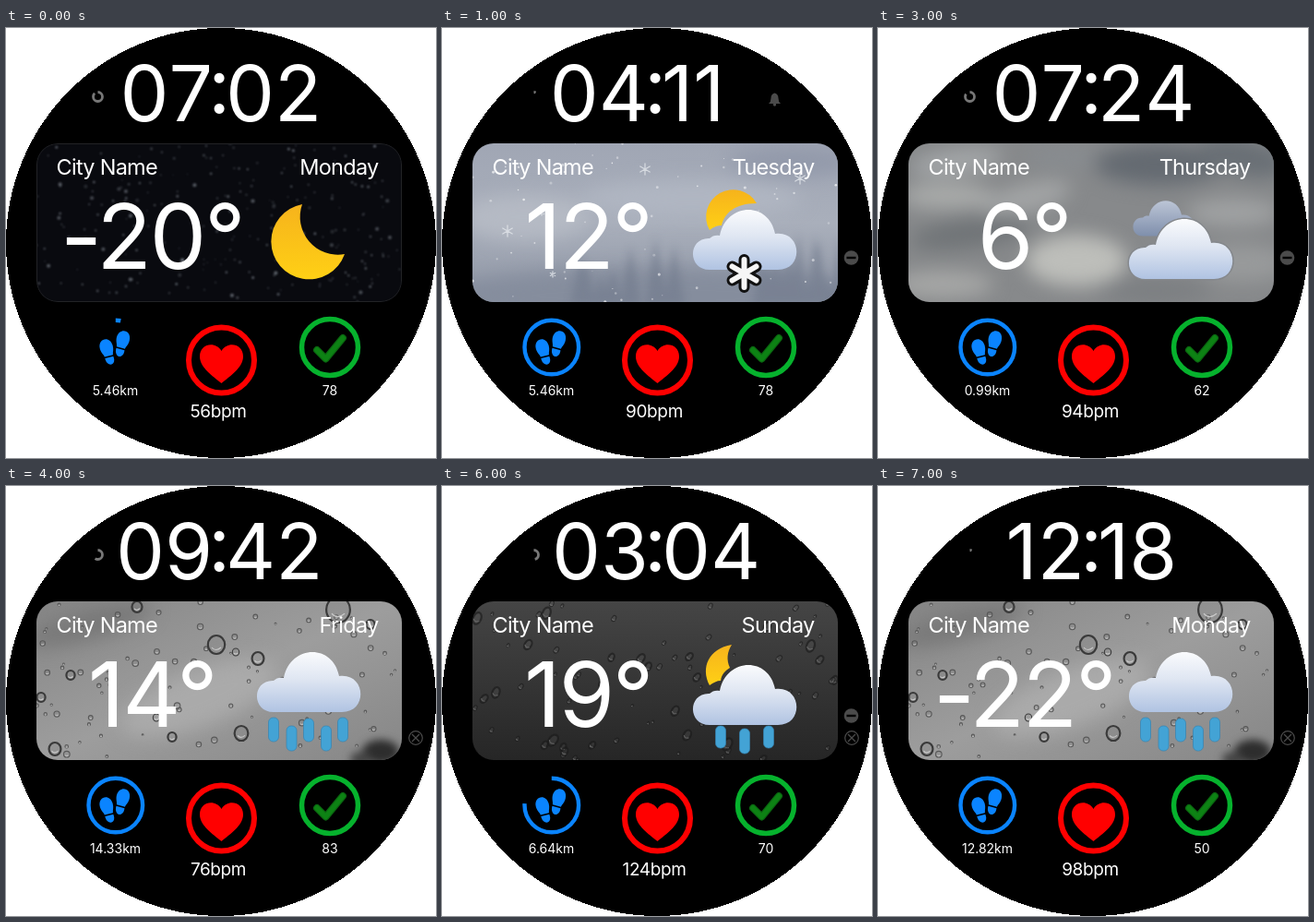
An HTML page for the animation above (8 s loop, 466 by 466 pixels).

```html
<!DOCTYPE html>
<html lang="en">
<head>
<meta charset="utf-8">
<title>Watch face</title>
<style>
  html, body { margin: 0; width: 100%; height: 100%; overflow: hidden; background: #fff; }
  svg { display: block; width: 466px; height: 466px; }
  filter { color-interpolation-filters: sRGB; }
  text { font-family: Inter, Roboto, sans-serif; font-optical-sizing: none; fill: #fff; }
  .time { font-size: 84px; font-kerning: none; }
  .temp { font-size: 98px; letter-spacing: -.025em; }
  .label { font-size: 23.5px; letter-spacing: -.031em; }
  .pulse { font-size: 19px; letter-spacing: -.02em; }
  .small { font-size: 14px; }
  .mid { text-anchor: middle; }
  .end { text-anchor: end; }
  .face { visibility: hidden; }
  .face.on { visibility: visible; }
</style>
</head>
<body>
<svg viewBox="0 0 466 466">
  <defs>
    <clipPath id="card"><rect x="33" y="125" width="396" height="172" rx="23"/></clipPath>
    <filter id="soft" x="-50%" y="-50%" width="200%" height="200%"><feGaussianBlur stdDeviation="10"/></filter>
    <filter id="haze" x="-50%" y="-50%" width="200%" height="200%"><feGaussianBlur stdDeviation="4"/></filter>
    <filter id="tiny" x="-50%" y="-50%" width="200%" height="200%"><feGaussianBlur stdDeviation=".8"/></filter>
    <linearGradient id="cloud" x1="0" y1="0" x2="0" y2="1">
      <stop offset="0" stop-color="#fafbfd"/><stop offset=".45" stop-color="#dfe6f2"/><stop offset="1" stop-color="#b0c3e2"/>
    </linearGradient>
    <linearGradient id="shade" x1="0" y1="0" x2="0" y2="1">
      <stop offset="0" stop-color="#bcc5d6"/><stop offset="1" stop-color="#7f8fac"/>
    </linearGradient>
    <linearGradient id="gold" x1="0" y1="0" x2="0" y2="1">
      <stop offset="0" stop-color="#f6b31c"/><stop offset="1" stop-color="#ffd015"/>
    </linearGradient>
    <linearGradient id="snowSky" x1="0" y1="0" x2="0" y2="1">
      <stop offset="0" stop-color="#a0a6b4"/><stop offset=".5" stop-color="#a9afbb"/><stop offset="1" stop-color="#8f96a5"/>
    </linearGradient>
    <linearGradient id="wetDark" x1="0" y1="0" x2="0" y2="1">
      <stop offset="0" stop-color="#454545"/><stop offset="1" stop-color="#262626"/>
    </linearGradient>
    <linearGradient id="wetLight" x1="0" y1="0" x2="1" y2="1">
      <stop offset="0" stop-color="#858585"/><stop offset=".5" stop-color="#9d9d9d"/><stop offset="1" stop-color="#868686"/>
    </linearGradient>
  </defs>
  <circle cx="233" cy="233" r="233" shape-rendering="crispEdges"/>
  <g id="faces"></g>
</svg>
<script>
const STEP = 1000;
const BLUE = '#0a84ff';

const seeded = seed => () => {
  seed = (seed * 16807) % 2147483647;
  return seed / 2147483647;
};
const times = (n, fn) => Array.from({ length: n }, (_, i) => fn(i)).join('');
const group = (attrs, body) => `<g ${attrs}>${body}</g>`;
const text = (x, y, cls, s) => `<text x="${x}" y="${y}" class="${cls}">${s}</text>`;
const circle = (x, y, r, attrs) => `<circle cx="${x}" cy="${y}" r="${r}" ${attrs}/>`;
const oval = (x, y, rx, ry, fill, turn = 0) =>
  `<ellipse cx="${x}" cy="${y}" rx="${rx}" ry="${ry}" fill="${fill}" transform="rotate(${turn} ${x} ${y})"/>`;
const path = (d, attrs) => `<path d="${d}" ${attrs}/>`;
const fillCard = fill => `<rect x="33" y="125" width="396" height="172" fill="${fill}"/>`;

// Progress arc, clockwise from the top
const arc = (x, y, r, part, color, width) =>
  circle(x, y, r, `fill="none" stroke="${color}" stroke-width="${width}" pathLength="100"
    stroke-dasharray="${part * 100} 200" transform="rotate(-90 ${x} ${y})"`);

const flake = (x, y, r, attrs) => path(times(3, i => {
  const a = Math.PI * (i / 3 + .5), dx = r * Math.cos(a), dy = r * Math.sin(a);
  return `M${x - dx} ${y - dy}L${x + dx} ${y + dy}`;
}), `fill="none" stroke-linecap="round" ${attrs}`);

const star = (x, y, r) => path('M' + Array.from({ length: 12 }, (_, i) => {
  const a = Math.PI * (i / 6 + .5), d = i % 2 ? r * .52 : r;
  return `${x + d * Math.cos(a)} ${y + d * Math.sin(a)}`;
}).join('L') + 'Z', 'fill="#eef0f4" stroke="#858b96" stroke-width="1.2" stroke-linejoin="round"');

const droplet = (x, y, r, rim, glint, squeeze = 1) =>
  `<ellipse cx="${x}" cy="${y}" rx="${r * squeeze}" ry="${r}" fill="#777" fill-opacity=".25" stroke="${rim}" stroke-width="${r > 4 ? 2.2 : 1.1}"/>` +
  path(`M${x - r * .5} ${y + r * .3}q${r * .4} ${r * .5} ${r} 0`, `fill="none" stroke="${glint}" stroke-width="1.2"`);

// Card backgrounds
const skies = {
  night() {
    const rnd = seeded(71);
    return fillCard('#090a0f') +
      group('filter="url(#tiny)"', times(260, () => {
        const big = rnd() > .86;
        return circle(33 + rnd() * 396, 125 + rnd() * 172, big ? 2 : .7 + rnd() * .7,
          `fill="#9aa2ad" opacity="${.2 + rnd() * (big ? .4 : .5)}"`);
      })) +
      '<rect x="33.5" y="125.5" width="395" height="171" rx="22.5" fill="none" stroke="#222326"/>';
  },
  forest(seed) {
    const rnd = seeded(seed);
    return fillCard('url(#snowSky)') +
      group('filter="url(#soft)"', oval(90, 205, 70, 24, '#b5bac4') + oval(270, 185, 120, 20, '#b0b6c2') +
        oval(380, 145, 70, 16, '#9299aa') + oval(230, 290, 230, 30, '#858d9d')) +
      group('filter="url(#haze)" fill="#737c8e" opacity=".65"', times(22, () => {
        const x = 150 + rnd() * 285, h = 30 + rnd() * 50;
        return path(`M${x - 11} 300L${x} ${300 - h}L${x + 11} 300Z`, '');
      }));
  },
  snow() {
    const rnd = seeded(37);
    const spots = [[71, 220], [220, 153], [388, 163], [108, 200], [120, 267]];
    return skies.forest(19) +
      times(65, () => circle(33 + rnd() * 396, 125 + rnd() * 172, .5 + rnd() * 1.1,
        `fill="#fff" opacity="${.25 + rnd() * .5}"`)) +
      spots.map(([x, y], i) => flake(x, y, i < 3 ? 6 : 3, 'stroke="#e3e6ec" stroke-width="1.3" opacity=".8"')).join('');
  },
  fog: () => skies.forest(53),
  clouds: () => fillCard('#87898b') + group('filter="url(#soft)"',
    oval(85, 145, 50, 14, '#a3a6a8', -8) + oval(75, 182, 50, 14, '#a9abaa') +
    oval(160, 185, 50, 16, '#a2a4a5', -15) + oval(200, 140, 40, 12, '#888c90') +
    oval(305, 148, 70, 22, '#646a71') + oval(395, 140, 50, 20, '#696f75', 12) +
    oval(100, 222, 65, 16, '#707477', -8) + oval(215, 252, 55, 28, '#bdbeba') +
    oval(385, 200, 50, 15, '#a0a2a3') + oval(395, 255, 50, 20, '#989a9b') +
    oval(70, 278, 55, 15, '#a6a7a6') + oval(300, 285, 60, 14, '#7c7f82')),
  darkRain() {
    const rnd = seeded(91);
    return fillCard('url(#wetDark)') + times(80, () => {
      const x = 33 + rnd() * 396, y = 125 + rnd() * 172, r = 1.5 + rnd() * rnd() * 8;
      return group(`opacity=".65" transform="rotate(${20 + rnd() * 25} ${x} ${y})"`,
        droplet(x, y, r, '#1c1c1c', '#777', .65));
    });
  },
  rain() {
    const rnd = seeded(43);
    const spots = [[228, 172, 10], [273, 187, 7], [249, 180, 4], [255, 268, 8], [180, 272, 5],
      [53, 285, 7], [38, 229, 5], [360, 134, 14], [163, 251, 4], [395, 150, 5], [142, 131, 6], [70, 205, 5]];
    return fillCard('url(#wetLight)') +
      group('filter="url(#soft)"', oval(90, 150, 70, 16, '#787878', -15) + oval(210, 230, 90, 30, '#aaa', -20)) +
      group('filter="url(#haze)"', oval(406, 288, 20, 13, '#2d2d2d') + oval(385, 296, 12, 8, '#444')) +
      times(80, () => droplet(33 + rnd() * 396, 125 + rnd() * 172, .8 + rnd() * 2.6, '#595959', '#bbb')) +
      spots.map(([x, y, r]) => droplet(x, y, r, '#3a3a3a', '#c9c9c9', .92)).join('');
  }
};

// Weather icons
const CLOUD = 'M290 245C266 245 266 210 290 211C293 208 297 207 301 208C308 172 354 170 361 206C390 202 393 245 364 245Z';
const cloud = (dy, fill = 'cloud', more = '') =>
  path(CLOUD, `fill="url(#${fill})" transform="translate(0 ${dy}) ${more}"`);
const sun = path('M341 190A28 28 0 1 0 290 219C295 215 299 214 303 214C306 201 317 190 341 190Z', 'fill="url(#gold)"');
const drops = list => list.map(([x, y, h]) =>
  `<rect x="${x - 5.5}" y="${y}" width="11" height="${h}" rx="5" fill="#43a3d5" stroke="#3585b2" stroke-width=".7"/>`).join('');

const icons = {
  moon: () => path('M321 191A41 41 0 1 0 367 245A41 41 0 0 1 321 191Z', 'fill="url(#gold)"'),
  sunSnow: () => sun + cloud(17) +
    flake(327.5, 266, 15, 'stroke="#111" stroke-width="12"') +
    flake(327.5, 266, 15, 'stroke="#f6f6f6" stroke-width="6"'),
  sunCloud: () => sun + cloud(17),
  clouds: () => cloud(0, 'shade', 'translate(116 81) scale(.59)') +
    path(CLOUD, 'fill="none" stroke="#85888c" stroke-width="3" transform="translate(0 27)"') + cloud(27),
  snow: () => cloud(0) + star(296, 264, 12) + star(327.5, 270, 12) + star(360, 264, 12),
  moonRain: () => path('M314 172C289 176 280 197 290 216C294 213 298 211 302 211C303 204 307 200 312 197C308 188 309 180 314 172Z', 'fill="url(#gold)"') +
    cloud(14) + drops([[302, 260, 24], [328, 263, 27], [354, 260, 24]]),
  rain: () => cloud(0) + drops([[290, 251, 26], [309.5, 260, 27], [328, 252, 25], [347, 260, 27], [365, 251, 26]])
};

// Status symbols
const GRAY = '#4b4b4b';
const status = {
  bell: () => path('M354 82Q356.500 80 356.500 76Q356.500 71.500 360.500 70.500Q364.500 71.500 364.500 76Q364.500 80 367 82Z', `fill="${GRAY}"`) +
    circle(360.5, 83, 1.7, `fill="${GRAY}"`),
  quiet: () => circle(443.5, 249, 7.8, `fill="${GRAY}"`) + '<rect x="438.500" y="247.800" width="10" height="2.400"/>',
  lock: () => `<rect x="438.500" y="224.500" width="11" height="8.500" rx="1" fill="${GRAY}"/>` +
    path('M440.8 225v-2.500a3.200 3.200 0 0 1 6.400 0v2.500', `fill="none" stroke="${GRAY}" stroke-width="1.7"`) +
    circle(444, 228.500, 1.2, ''),
  offline: () => circle(444, 273, 7.3, `fill="none" stroke="${GRAY}" stroke-width="1.2"`) +
    path('M440 269l8 8M448 269l-8 8', `stroke="${GRAY}" stroke-width="1.3"`)
};

const foot = (x, y, turn) => group(`transform="translate(${x} ${y}) rotate(${turn}) scale(1.1)" fill="${BLUE}"`,
  path('M-6.500 -3C-6.500 -13 6 -14 6.500 -3C6.700 1 5 3 4.500 6L-4 6C-4.500 3 -6.500 1 -6.500 -3Z', '') +
  path('M-4 7.500L4.500 7.500C6 17 -4 17.500 -4 7.500Z', ''));

const CHECK = 'M337 349L346.5 358.5L365 336';
const check = (color, width) =>
  path(CHECK, `fill="none" stroke="${color}" stroke-width="${width}" stroke-linejoin="round" stroke-linecap="round"`);

const badges = foot(109.5, 349, -14) + foot(126, 340, 16) +
  circle(233.5, 360, 35.5, 'fill="none" stroke="#f00" stroke-width="6"') +
  path('M233.5 385C224 377 210 368 210 356C210 342 227 339 233.5 350C240 339 257 342 257 356C257 368 243 377 233.5 385Z', 'fill="#f00"') +
  circle(351, 346, 30.5, 'fill="none" stroke="#06b22d" stroke-width="5.5"') +
  check('#0a6410', 8) + check('#0d8214', 5.5);

// time, day, temperature, sky, icon, km, goal, pulse, score, dial, symbols
const rows = [
  ['07:02', 'Monday', '-20°', 'night', 'moon', '5.46', .03, 56, 78, .88, ''],
  ['04:11', 'Tuesday', '12°', 'snow', 'sunSnow', '5.46', 1, 90, 78, .07, 'bell quiet'],
  ['05:36', 'Wednesday', '8°', 'clouds', 'sunCloud', '0.99', 1, 82, 62, .4, ''],
  ['07:24', 'Thursday', '6°', 'clouds', 'clouds', '0.99', 1, 94, 62, .85, 'quiet'],
  ['09:42', 'Friday', '14°', 'rain', 'rain', '14.33', 1, 76, 83, .6, 'offline'],
  ['02:20', 'Saturday', '-22°', 'fog', 'snow', '14.33', 1, 55, 83, .25, 'lock'],
  ['03:04', 'Sunday', '19°', 'darkRain', 'moonRain', '6.64', .76, 124, 70, .46, 'quiet offline'],
  ['12:18', 'Monday', '-22°', 'rain', 'rain', '12.82', 1, 98, 50, .07, 'offline']
];

const face = ([clock, day, temp, sky, icon, km, goal, pulse, score, dial, symbols]) => {
  const [hours, minutes] = clock.split(':');
  return group('class="face"',
    text(224, 100.5, 'time end', hours) + text(231, 92, 'time mid', ':') + text(238, 100.5, 'time', minutes) +
    arc(99.5, 74.5, 5, dial, '#777', 2.8) +
    group('clip-path="url(#card)"', skies[sky]()) +
    text(54.5, 159, 'label', 'City Name') + text(403.5, 159, 'label end', day) +
    text(158, 261, 'temp mid', temp) + icons[icon]() +
    arc(118.8, 346, 29.3, goal, BLUE, 4.4) + badges +
    text(118.5, 398, 'small mid', km + 'km') +
    text(230, 422, 'pulse mid', pulse + 'bpm') +
    text(351, 398, 'small mid', score) +
    symbols.split(' ').filter(Boolean).map(name => status[name]()).join(''));
};

const root = document.getElementById('faces');
root.innerHTML = rows.map(face).join('');
const faces = [...root.children];

function draw() {
  const now = Math.floor(performance.now() / STEP) % faces.length;
  faces.forEach((el, i) => el.classList.toggle('on', i === now));
  requestAnimationFrame(draw);
}
draw();
</script>
</body>
</html>
```
